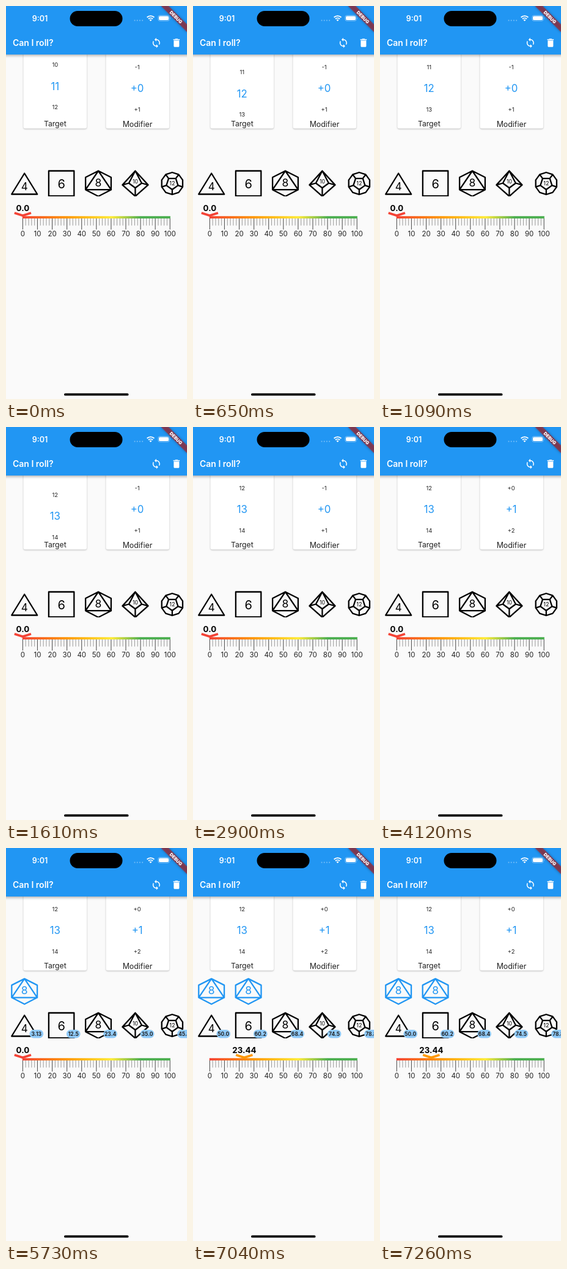
Write an HTML page that moves like this. It is 296 px wide and 640 px high and loops after 8000 ms.

```html
<!DOCTYPE html>
<html lang="en">
<head>
<meta charset="utf-8">
<title>Can I roll?</title>
<style>
  html, body { margin: 0; width: 100%; height: 100%; overflow: hidden; background: #fafafa; }
  svg { display: block; width: 296px; height: 640px; }
  text { font-family: Inter, Roboto, sans-serif; }
  .card { fill: #fff; filter: drop-shadow(0 1px 1px rgba(0, 0, 0, .25)); }
  .bar { fill: #2196f3; filter: drop-shadow(0 2px 2px rgba(0, 0, 0, .3)); }
  .band { fill: #b71c1c; fill-opacity: .63; filter: drop-shadow(0 0 2px rgba(0, 0, 0, .5)); }
  .die { fill: none; stroke-width: 2.3; stroke-linejoin: round; }
</style>
</head>
<body>
<svg id="stage" viewBox="0 0 296 640">
  <defs>
    <linearGradient id="scale" gradientUnits="userSpaceOnUse" x1="27" y1="0" x2="269" y2="0">
      <stop offset="0" stop-color="#f44336"/>
      <stop offset=".3" stop-color="#ff9800"/>
      <stop offset=".6" stop-color="#ffeb3b"/>
      <stop offset=".8" stop-color="#4caf50"/>
      <stop offset="1" stop-color="#4caf50"/>
    </linearGradient>
    <clipPath id="wheel"><rect y="80" width="296" height="106"/></clipPath>
    <clipPath id="shelf"><rect y="260" width="296" height="50"/></clipPath>
  </defs>
  <rect width="296" height="640" fill="#fafafa"/>
  <rect class="card" x="28.5" y="70" width="103.5" height="129.5" rx="3"/>
  <rect class="card" x="163.5" y="70" width="103.5" height="129.5" rx="3"/>
  <g id="wheels" clip-path="url(#wheel)"></g>
  <g id="body"></g>
  <g id="rolled"></g>
  <g id="dice" clip-path="url(#shelf)"></g>
  <g id="badges"></g>
  <g id="pointer"></g>

  <rect class="bar" x="-5" y="-5" width="306" height="84"/>
  <rect x="104.5" y="8" width="86" height="25" rx="12.5"/>
  <g id="heading"></g>
  <g fill="#fff">
    <g opacity=".4">
      <circle cx="210.5" cy="23.5" r="1"/><circle cx="214.7" cy="23.5" r="1"/>
      <circle cx="218.9" cy="23.5" r="1"/><circle cx="223.1" cy="23.5" r="1"/>
    </g>
    <path d="M236.5 24.8l-2-2.1a2.9 2.9 0 0 1 4 0z"/>
    <g fill="none" stroke="#fff" stroke-width="1.8">
      <path d="M232.9 21a5.2 5.2 0 0 1 7.2 0"/>
      <path d="M230.6 18.5a8.5 8.5 0 0 1 11.8 0"/>
    </g>
    <rect x="248.8" y="15.3" width="18.4" height="9" rx="2.8" fill="none" stroke="#fff" stroke-opacity=".5" stroke-width=".8"/>
    <rect x="250" y="16.5" width="16" height="6.6" rx="1.8"/>
    <path d="M268.2 18.3q1.5 1.5 0 3z" opacity=".6"/>
    <path transform="translate(236.8 51) scale(.753)" d="M12 4V1L8 5l4 4V6c3.31 0 6 2.69 6 6 0 1.01-.25 1.97-.7 2.8l1.46 1.46C19.54 15.03 20 13.57 20 12c0-4.42-3.58-8-8-8zm0 14c-3.31 0-6-2.69-6-6 0-1.01.25-1.97.7-2.8L5.24 7.74C4.46 8.97 4 10.43 4 12c0 4.42 3.58 8 8 8v3l4-4-4-4v3z"/>
    <path transform="translate(269.8 51) scale(.753)" d="M6 19c0 1.1.9 2 2 2h8c1.1 0 2-.9 2-2V7H6v12zM19 4h-3.5l-1-1h-5l-1 1H5v2h14V4z"/>
  </g>
  <g transform="translate(296 0) rotate(45)">
    <rect class="band" x="-30.1" y="21.1" width="60.2" height="9"/>
    <text x="0" y="28.3" font-size="7.4" font-weight="900" fill="#fff" text-anchor="middle">DEBUG</text>
  </g>
  <rect x="95" y="630.8" width="105.5" height="3.8" rx="1.9"/>
</svg>
<script>
const LOOP = 8000, BLUE = '#2196f3', INK = '#212121';
const ROW = 34.5, CENTER = 133.6, PITCH = 60.4, GAUGE = { x: 27.4, w: 240.8 };
const $ = id => document.getElementById(id);

// [time, value] steps, each held until the next
const targetSteps = [
  [0, 11.09], [110, 11.2], [220, 11.33], [330, 11.46], [430, 11.56], [540, 11.66],
  [650, 11.74], [760, 11.84], [870, 11.93], [970, 11.98], [1090, 12],
  [1280, 12.08], [1390, 12.28], [1500, 12.5], [1610, 12.68], [1720, 12.78],
  [1830, 12.85], [1940, 12.91], [2040, 12.97], [2160, 13]
];
const modifierSteps = [
  [0, 0], [3010, .06], [3120, .18], [3230, .32], [3340, .45], [3450, .56],
  [3560, .66], [3680, .74], [3900, .88], [4010, .97], [4120, 1]
];
const rollSteps = [[0, 0], [5510, 1], [7040, 2]];

const stepAt = (steps, t) => steps.reduce((v, [at, next]) => t >= at ? next : v, steps[0][1]);

function label(str, x, y, size, { fill = INK, weight = 400, anchor = 'middle' } = {}) {
  return `<text x="${x}" y="${(y + size * .364).toFixed(2)}" font-size="${size}" fill="${fill}" ` +
    `font-weight="${weight}" text-anchor="${anchor}">${str}</text>`;
}

const ring = (n, r, turn) => Array.from({ length: n }, (_, i) => {
  const a = (turn + i * 360 / n) * Math.PI / 180;
  return [r * Math.cos(a), r * Math.sin(a)].map(v => v.toFixed(2));
});
const closed = points => 'M' + points.join('L') + 'Z';

function d12Path() {
  const outer = ring(10, 18, 90), inner = ring(5, 10, 90);
  return closed(outer) + closed(inner) + inner.map((p, i) => `M${p}L${outer[i * 2]}`).join('');
}

// Outlines are drawn around the centre of each die
const shapes = {
  4: { path: 'M0-16.5L21 17.5H-21Z', y: 4.3, size: 17 },
  6: { path: 'M-20.7-20.5H20.7V20.3H-20.7Z', y: 1.2, size: 20 },
  8: { path: 'M0-20.5L20.9-10V10.2L0 20.9L-20.9 10.2V-10ZM0-20.5L20.9 10.2H-20.9Z', y: -1.8, size: 17.5 },
  10: { path: 'M0-20.5L21 2.4L0 20.9L-21 2.4ZM0-20.5L10.5-.5L0 7.2L-10.5-.5ZM10.5-.5L21 2.4M-10.5-.5L-21 2.4M0 7.2V20.9', y: -2.8, size: 8.5 },
  12: { path: d12Path(), y: -.6, size: 9 }
};
const sides = [4, 6, 8, 10, 12];

function die(n, slot, y, color) {
  const s = shapes[n];
  return `<g transform="translate(${30.2 + slot * PITCH} ${y})">` +
    `<path class="die" stroke="${color}" d="${s.path}"/>${label(n, 0, s.y, s.size, { fill: color })}</g>`;
}

// Percentage chance that the dice add up to at least `need`
function chance(dice, need) {
  if (!dice.length) return need <= 0 ? 100 : 0;
  const [n, ...rest] = dice;
  let sum = 0;
  for (let face = 1; face <= n; face++) sum += chance(rest, need - face);
  return sum / n;
}

function wheel(pos, x, format) {
  const chosen = Math.round(pos);
  let out = '';
  for (let v = chosen - 2; v <= chosen + 2; v++) {
    const on = v === chosen;
    out += label(format(v), x, CENTER + (v - pos) * ROW, on ? 16.8 : 9.4, { fill: on ? BLUE : INK });
  }
  return out;
}

function gauge() {
  let out = '';
  for (let i = 0; i <= 50; i++) {
    const x = GAUGE.x + GAUGE.w * i / 50, major = i % 5 === 0;
    out += `<path d="M${x} 346V${major ? 364 : 357.5}" stroke="${major ? '#555' : '#808080'}" stroke-width="${major ? 1.1 : .8}"/>`;
    if (major) out += label(i * 2, x, 371, 11.5);
  }
  return out + '<rect x="26.8" y="342.2" width="242" height="3.8" fill="url(#scale)"/>';
}

function badge(value, slot) {
  const x = 49.8 + slot * PITCH;
  return `<rect x="${x - 11.4}" y="296" width="22.8" height="13.5" rx="6.7" fill="#90caf9"/>` +
    label(value.toPrecision(3), x, 302.8, 8.5, { weight: 700 });
}

function pointer(value) {
  const x = GAUGE.x + GAUGE.w * value / 100;
  return `<path d="M${x - 13.6} 337L${x} 341.2L${x + 13.6} 337" fill="none" ` +
    `stroke="${value ? '#ff9800' : '#f44336'}" stroke-width="3.8"/>` +
    label(value ? value.toFixed(2) : '0.0', x, 329.6, 13.3, { weight: 700, fill: '#000' });
}

function showRoll(count) {
  const rolled = Array(count).fill(8), need = 12;
  $('rolled').innerHTML = rolled.map((n, i) => die(n, i, 233.4, BLUE)).join('');
  $('badges').innerHTML = count ? sides.map((n, i) => badge(chance([...rolled, n], need), i)).join('') : '';
  $('pointer').innerHTML = pointer(chance(rolled, need));
}

$('body').innerHTML = label('Target', 80.3, 192, 12.2) + label('Modifier', 215, 192, 12.4) + gauge();
$('dice').innerHTML = sides.map((n, i) => die(n, i, 289, '#000')).join('');
$('heading').innerHTML =
  label('9:01', 55.5, 20, 12.5, { fill: '#fff', weight: 600 }) +
  label('Can I roll?', 11, 60, 14, { fill: '#fff', weight: 600, anchor: 'start' });

const start = performance.now();
let shown = '';

function draw() {
  const t = (performance.now() - start) % LOOP;
  const target = stepAt(targetSteps, t), modifier = stepAt(modifierSteps, t), count = stepAt(rollSteps, t);
  const state = [target, modifier, count].join();
  if (state !== shown) {
    shown = state;
    $('wheels').innerHTML = wheel(target, 80.3, v => v) +
      wheel(modifier, 214.6, v => v < 0 ? v : '+' + v);
    showRoll(count);
  }
  requestAnimationFrame(draw);
}
draw();
</script>
</body>
</html>
```
